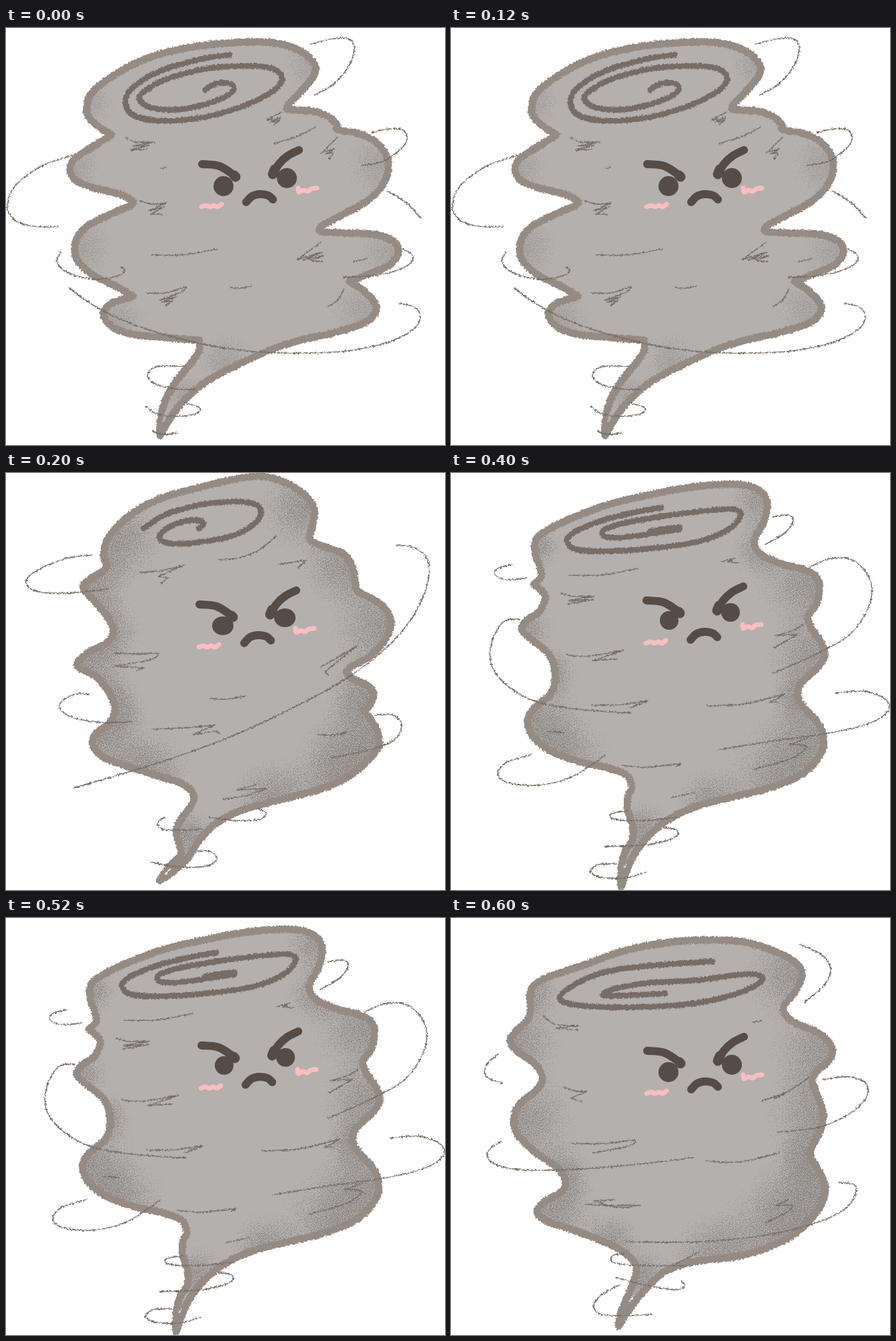
These frames come from a looping animation (658x625 px, 0.76 s). An HTML page:

```html
<!DOCTYPE html>
<html lang="en">
<head>
<meta charset="utf-8">
<title>Grumpy whirlwind</title>
<style>
html, body { margin: 0; width: 100%; height: 100%; overflow: hidden; background: #fff; }
svg { display: block; width: 100%; height: 100%; }
.line { fill: none; stroke-linecap: round; stroke-linejoin: round; }
</style>
</head>
<body>
<svg id="stage" viewBox="0 0 658 625">
  <defs>
    <radialGradient id="soft">
      <stop offset="0" stop-opacity=".8"/>
      <stop offset=".4" stop-opacity=".6"/>
      <stop offset="1" stop-opacity="0"/>
    </radialGradient>
    <filter id="rough" filterUnits="userSpaceOnUse" x="0" y="0" width="658" height="625" color-interpolation-filters="sRGB">
      <feTurbulence type="fractalNoise" baseFrequency=".35" numOctaves="2" seed="4"/>
      <feDisplacementMap in="SourceGraphic" scale="5" xChannelSelector="R" yChannelSelector="G"/>
    </filter>
    <filter id="grain" filterUnits="userSpaceOnUse" x="0" y="0" width="658" height="625" color-interpolation-filters="sRGB">
      <feTurbulence type="fractalNoise" baseFrequency=".8" numOctaves="2" seed="9"/>
      <feColorMatrix values="0 0 0 0 0  0 0 0 0 0  0 0 0 0 0  2.6 0 0 0 -.8" result="noise"/>
      <feComposite in="SourceGraphic" in2="noise" operator="arithmetic" k2="2.2" k3="2.2" k4="-2.2" result="dots"/>
      <feFlood flood-color="#89837e"/>
      <feComposite in2="dots" operator="in"/>
    </filter>
  </defs>
</svg>
<script>
const NS = 'http://www.w3.org/2000/svg';
const stage = document.getElementById('stage');
const INK = '#766d67', FACE = '#554d45', RIM = '#958b82', FILL = '#b3b0ae', PINK = '#ffbdbd';

function add(parent, tag, attrs) {
  const el = document.createElementNS(NS, tag);
  for (const key in attrs) el.setAttribute(key, attrs[key]);
  return parent.appendChild(el);
}

// Smooth curve through points; "|" makes a corner, ";" starts a new stroke.
function curve(text) {
  return text.split(';').map(stroke => {
    let d = '', last = null;
    for (const run of stroke.split('|')) {
      const p = run.trim().split(/\s+/).map(s => s.split(',').map(Number));
      if (last) p.unshift(last);
      else d = 'M' + p[0];
      for (let i = 0; i < p.length - 1; i++) {
        const a = p[i], b = p[i + 1], before = p[i - 1] || a, after = p[i + 2] || b;
        const c1 = a.map((v, k) => v + (b[k] - before[k]) / 6);
        const c2 = b.map((v, k) => v - (after[k] - a[k]) / 6);
        d += `C${c1} ${c2} ${b}`;
      }
      last = p[p.length - 1];
    }
    return d;
  }).join('');
}

const line = (parent, text, color, width) =>
  add(parent, 'path', { class: 'line', d: curve(text), stroke: color, 'stroke-width': width });

const poses = [
  {
    hold: 200, face: [0, 0], mouth: [0, 0], eyes: [326, 237, 421, 225, 15, 15], shade: .55,
    body: '121,119 128,98 160,72 210,46 270,30 340,22 400,22 440,34 462,54 462,70 445,92 423,115|423,122 455,124 482,132 497,146|499,153 535,160 562,178 573,205 565,235 540,260 500,282 472,297|472,305 500,307 550,309 580,319 588,336 575,355 545,368 515,380|535,393 553,412 553,428 535,443 490,457 440,468 395,483 340,508 300,530 265,560 243,590 231,611|' +
      '231,590 238,560 255,530 275,505 289,485 290,468|240,464 190,459 158,447 146,428 158,413 190,402|165,387 130,370 107,348 104,322 118,300 150,282 185,267|190,260 170,249 130,239 104,228 96,212 103,196 130,178 158,160|135,145 122,130 121,119',
    swirl: '335,40 290,47 235,63 195,85 179,108 190,130 230,139 290,135 350,119 395,98 414,77 400,61 360,57 300,61 240,77 207,95 200,108 220,120 260,122 310,111 338,97 340,86 325,82 308,86 299,93',
    wind: '457,24 490,16 515,17 522,33 512,60 490,85 463,100;548,157 575,151 595,153 601,167 590,183 565,200 533,206;571,244 600,262 622,285;100,191 55,206 15,235 2,265 12,287 40,297 79,298;82,336 76,350 88,364 120,375 155,375 177,366 173,358;94,389 130,415 180,440 250,463 330,480 410,487 500,485 570,472 610,452 621,433 612,418 589,413;595,331 610,342 600,357 560,370 505,374;268,507 225,508 212,521 225,534 255,541 284,542;210,567 225,578 255,582 285,578 290,569 265,561;219,604 235,609 256,607',
    marks: '180,165 195,171 222,171|190,177|214,176|187,183|211,182;200,259 220,264 240,262|214,274|237,268|217,279|233,279;210,397 240,397 269,388 262,396 231,408|254,403|234,411|250,408|240,416;219,340 265,340 317,331;336,389 350,390 368,387;232,210 239,209;402,173 435,163 464,149;413,126|390,138|412,134|396,141|411,138|402,145;497,164|473,187|492,181|479,189|490,186|485,197;472,321|437,347|474,336|445,348|476,341|457,349|475,350;506,392 497,408 482,418;520,350 541,346',
    tip: '236,589 239,576',
    blobs: '120,110,50 100,210,50 110,330,60 160,440,60 570,205,70 580,335,60 545,425,70 460,55,50 330,500,50 265,550,40'
  },
  {
    hold: 200, face: [-4, -7], mouth: [-3, -6], eyes: [325, 229, 418, 217, 16, 14], shade: 1,
    body: '147,120 150,103 165,82 195,57 235,37 300,19 350,8 385,5 420,15 450,35 462,55 460,75 455,95|459,103 485,113 507,122 520,143 524,170|528,178 555,192 573,210 577,228 567,252 545,275 518,290 510,298|520,309 540,317 551,330 547,345 537,357|547,370 557,388 559,408 545,428 510,457 470,474 410,490 355,505 315,525 290,550 270,580 245,602 230,611|' +
      '245,590 262,572 259,555 255,535 265,515 280,495 279,478 262,465 225,453 180,439 145,425 130,408 135,390 155,375 163,355 155,330 135,305 110,292 108,283 125,268 150,255 161,240 155,220 135,195 116,172 125,160 147,146 151,135|147,128 147,120',
    swirl: '206,83 240,62 290,48 340,43 374,47 382,60 370,78 340,94 295,103 250,106 230,98 240,84 265,73 290,71 296,77 289,83',
    wind: '129,123 90,128 45,147 30,163 45,177 90,180 154,174;585,108 612,112 632,130 632,165 610,215 570,262 510,308 430,352 330,398 220,437 102,472;125,332 105,331 84,342 82,355 105,368 150,374 189,373;553,363 580,363 593,378 582,400 545,415 487,427;237,516 227,525 240,535 295,534;378,503 390,510 380,519 345,521 304,516;284,567 305,567 316,578 300,589 255,590 217,583',
    marks: '201,149 235,146 267,138|228,155|243,157|233,165;320,130 350,127 380,115 404,95;408,137 440,132 450,131|438,142;162,270 200,271 228,270 215,280 160,290|207,292|196,296;472,291|526,259|478,298|484,303;305,338 330,339 360,334;220,384 265,382 313,378|280,392|316,387|320,391;467,392 490,393 510,388|503,393;375,467|347,475|390,473|360,484|325,489',
    tip: '239,601 246,594',
    blobs: '165,100,80 125,170,70 150,235,60 115,285,80 155,350,60 130,400,100 215,450,70 450,50,80 510,135,80 570,230,95 545,330,70 550,400,100 500,455,90 400,490,70 270,545,50'
  },
  {
    hold: 200, face: [-1, -13], mouth: [-1, -11], eyes: [327, 221, 419, 209, 14, 14], shade: .95,
    body: '125,108 132,94 165,75 230,49 300,32 370,20 430,17 462,26 474,45 470,70 457,95 455,108 465,122 495,136 530,145 549,157 552,175 547,197 535,215 540,232 555,255 560,275 548,293 525,315 520,335 530,353 550,375 559,400 550,428 520,455 470,474 420,486 370,499 325,520 295,545 270,580 255,620|' +
      '255,595 260,570 272,550 272,528 265,505 265,485 271,470 262,452 235,442 190,432 150,417 123,395 115,370 127,350 150,330 156,300 147,272 125,253 107,236 112,222 132,208 141,188 137,177|124,167|135,155 133,140 127,125 125,108',
    swirl: '315,52 270,60 215,75 180,92 174,104 190,115 240,117 310,112 370,103 415,85 434,65 427,55 400,55 330,63 260,75 230,85 230,95 250,97 295,92',
    core: '299,89 341,83',
    wind: '92,137 70,143 66,153 85,160 114,157;103,219 80,222 62,250 60,285 80,315 125,342 190,354 270,360;121,422 85,433 70,450 85,464 130,468 180,456 231,423;482,66 505,63 513,72 500,90 471,107;538,141 570,128 605,132 628,160 628,195 600,240 550,270 483,300;575,330 620,327 652,340 655,357 625,376 560,391 480,402 400,415;264,506 240,511 245,519 290,521 340,516;319,531 338,535 335,546 295,557 230,560;249,586 220,587 209,598 225,606 260,607 293,598',
    marks: '176,153 225,153 280,143;164,180 185,185 214,185|175,192|213,190|176,196;172,272 200,275 258,266|213,281|250,279;210,348 255,347 296,341|268,352;145,387 169,389;257,438 290,441 344,436|338,440;329,487 364,479;384,349 440,346 501,331|478,344|490,343;406,133|425,128|415,133|432,135;527,228 510,237 486,244|519,242|485,262;535,397|508,407|533,410 510,428 454,444',
    tip: '259,591 262,587',
    blobs: '470,40,60 465,115,50 540,165,90 545,275,80 525,335,50 555,395,100 500,460,100 390,495,60 115,370,90 165,425,80 150,300,45 110,235,50 130,110,40 285,535,50'
  },
  {
    hold: 160, face: [0, -5], mouth: [0, -4], eyes: [326, 231, 421, 220, 15, 15], shade: .95,
    body: '118,122 122,103 145,89 200,70 260,49 330,36 390,33 440,36 490,52 520,70 526,88 516,110 500,130 500,143 515,157 550,172 570,192 568,212 548,230 542,245 550,268 558,295 553,320 540,345 540,360 552,380 561,405 552,435 520,470 480,492 430,507 365,515 320,530 290,558 268,585 251,612|' +
      '255,590 268,560 278,530 270,510 240,490 190,470 145,455 129,441 140,425 165,411 172,396 160,375 125,350 100,325 94,303 102,280 128,258 137,240 125,218 100,200 89,185 95,172 113,155 119,140 118,122',
    swirl: '392,65 330,69 250,77 200,92 165,115 172,127 220,133 300,133 370,127 430,113 465,95 460,85 430,85 370,93 300,97 245,106 228,116 260,116 321,113',
    wind: '522,39 555,55 569,75 560,100 530,126;71,204 53,220 53,238 77,248;558,242 595,238 622,248 622,270 595,295 550,314 490,321;75,335 55,350 62,367 100,377 180,377 280,369 363,359;582,397 605,400 604,420 580,443 520,465 440,480 350,486 262,485;260,503 242,506 245,517 290,521 354,521;248,539 290,550 335,557 350,552 345,544;253,550 225,565 214,582 225,594 260,596 301,594',
    marks: '139,147 155,159 190,162|157,165|190,168;168,253 185,259 204,260|180,270|197,276;180,338 230,338 275,333 265,342 213,352|226,350;202,429 240,431 284,430 250,434 214,424|246,422;452,156 466,154;536,239 505,260 465,274|500,264|485,271;382,364 430,366 492,352;505,422|487,431|512,431 500,443 472,456;338,518 371,501',
    tip: '268,574 272,569',
    blobs: '120,110,50 95,185,80 100,305,100 165,385,55 150,440,80 240,485,50 515,85,85 565,200,100 555,300,95 545,365,60 555,420,110 500,475,110 400,510,80 285,535,50'
  }
];

function drawFace(parent, pose) {
  const shifted = ([x, y]) => add(parent, 'g', { transform: `translate(${x} ${y})` });
  const brows = shifted(pose.face);
  line(brows, '294,204 320,207 344,222', FACE, 12);
  line(brows, '400,220 409,204 423,191 439,183', FACE, 12);
  line(brows, '342,221 344,223;400,219 403,212', FACE, 15);
  line(brows, '293,268 300,266 306,268 312,266 317,268 323,264', PINK, 7);
  line(brows, '438,240|439,246 446,243 452,245 458,241 466,240', PINK, 7);
  line(shifted(pose.mouth), '360,261 369,252 381,249 393,251 400,257', FACE, 12);
  const [x1, y1, x2, y2, rx, ry] = pose.eyes;
  add(parent, 'ellipse', { cx: x1, cy: y1, rx, ry, fill: FACE });
  add(parent, 'ellipse', { cx: x2, cy: y2, rx, ry, fill: FACE });
}

function build(pose, i) {
  const group = add(stage, 'g', { display: 'none' });
  const d = curve(pose.body);
  add(add(group, 'clipPath', { id: 'clip' + i }), 'path', { d });
  add(group, 'path', { d, fill: FILL });

  const shade = add(group, 'g', { 'clip-path': `url(#clip${i})`, opacity: pose.shade });
  const dots = add(shade, 'g', { filter: 'url(#grain)' });
  for (const blob of pose.blobs.split(' ')) {
    const [cx, cy, r] = blob.split(',');
    add(dots, 'circle', { cx, cy, r, fill: 'url(#soft)' });
  }

  const ink = add(group, 'g', { filter: 'url(#rough)' });
  add(ink, 'path', { class: 'line', d, stroke: RIM, 'stroke-width': 11 });
  line(ink, pose.tip, i ? '#efedec' : FILL, 2);
  line(ink, pose.swirl, INK, 8.5);
  if (pose.core) line(ink, pose.core, INK, 12);
  line(ink, pose.wind, INK, 1.7);
  line(ink, pose.marks, INK, 1.7);
  drawFace(group, pose);
  return group;
}

const groups = poses.map(build);
const total = poses.reduce((sum, pose) => sum + pose.hold, 0);
let shown = -1;

function render(ms) {
  let t = ms % total, i = 0;
  while (t >= poses[i].hold) t -= poses[i++].hold;
  if (i === shown) return;
  groups.forEach((g, k) => g.setAttribute('display', k === i ? 'inline' : 'none'));
  shown = i;
}

let start = null;
function tick(now) {
  if (start === null) start = now;
  render(Math.max(0, now - start));
  requestAnimationFrame(tick);
}
render(0);
requestAnimationFrame(tick);
</script>
</body>
</html>
```
